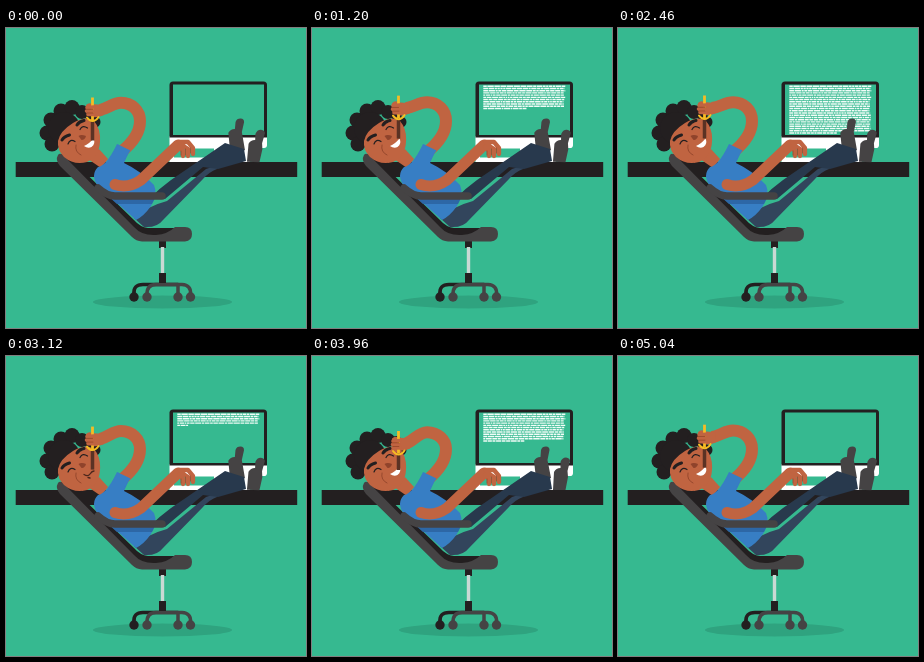
An HTML page for the animation above (5.07 s loop, 300x300 px).

```html
<!DOCTYPE html>
<html lang="en">
<head>
<meta charset="utf-8">
<title>Break at the desk</title>
<style>
  html, body { margin: 0; width: 100%; height: 100%; overflow: hidden; background: #36b990; }
  svg { display: block; width: 100vw; height: 100vh; }
  .line { fill: none; stroke-linecap: round; stroke-linejoin: round; }
  .flat { stroke-linecap: butt; }
</style>
</head>
<body>
<svg viewBox="0 0 300 300">
  <defs>
    <clipPath id="aboveLip"><path d="M70 50H100V114H70Z"/></clipPath>
  </defs>
  <rect width="300" height="300" fill="#36b990"/>
  <ellipse cx="156.500" cy="274" rx="69.500" ry="6.500" fill="#2fa37f"/>

  <!-- desk and monitor -->
  <path d="M163.500 119H244V134H163.500Z" fill="#fff"/>
  <path d="M168 120.500H208V129.500H168Z" fill="#36b990"/>
  <path d="M163.500 108H261V117Q261 120 258 120H166.500Q163.500 120 163.500 117Z" fill="#fff"/>
  <path d="M167 53.500H257.500Q261 53.500 261 57V109.500H163.500V57Q163.500 53.500 167 53.500Z" fill="#231f20"/>
  <rect x="167" y="56.500" width="91" height="50.500" fill="#36b990"/>
  <g id="screen" class="line flat" stroke="#f1fcf8" stroke-width="1.450"></g>
  <rect x="9.700" y="134" width="281.500" height="15" fill="#231f20"/>

  <!-- chair base -->
  <rect x="153" y="211" width="7" height="9" fill="#231f20"/>
  <rect x="154.800" y="219" width="3.400" height="27" fill="#c9d9d4"/>
  <path class="line" stroke="#231f20" stroke-width="3.500" d="M128 266Q127 256.500 137 256.500H172"/>
  <path class="line" stroke="#454344" stroke-width="3.500"
    d="M141 266Q141 256.500 150 256.500H176Q185 257 184.500 266M172 266V258"/>
  <rect x="153" y="245" width="7" height="10" fill="#231f20"/>
  <circle cx="128" cy="269" r="4.700" fill="#231f20"/>
  <g fill="#454344">
    <circle cx="141" cy="269" r="4.700"/><circle cx="172" cy="269" r="4.700"/>
    <circle cx="184.500" cy="269" r="4.700"/>
  </g>

  <!-- legs and shoes -->
  <path d="M128 190Q142 178 161 173L200 141L212 137L211 141Q203 144 197 151L157 192Q151 200 138 199Z" fill="#32455c"/>
  <g id="shoeL">
    <path d="M229 94Q230 90.500 234 90.500Q237.500 90.500 237.500 94L235.500 104L239 122L224 122L222 105Q224 101 228.500 101Z" fill="#454344"/>
  </g>
  <g id="shoeR">
    <path d="M248.500 106Q250 101.500 254 101.500Q258 102 258 105L255.500 115L256 121L253.500 134H241L242 116Q244 112 248.500 112Z" fill="#454344"/>
  </g>
  <path d="M144 170Q154 160 165 152L219 115L238 121L240 133L212 141L197 139L159 171Z" fill="#28394d"/>

  <!-- chair -->
  <path d="M54 127Q59 124 64 130L128 192Q134 199 142 200H170Q168 208 150 208H138L124 200Z" fill="#231f20"/>
  <path d="M52 127Q54 124 58 128L128 199Q136 208 150 207Q162 206 169 199H179Q186 199 186 206T179 213.500H136Q130 213 126 209L54 138Q49 132 52 127Z" fill="#454344"/>

  <!-- torso -->
  <path d="M82 131L93 121L102 131L95 140Z" fill="#c06441"/>
  <path d="M92 139Q95 139 101 133L112 116.500L124 122L118 135Q135 143 148 157Q152 166 145 178Q138 188 130 192L92 158Q84 147 92 139Z" fill="#377ec4"/>
  <path d="M102 168H150L146 176H111Z" fill="#2d67a6"/>

  <!-- chair arm and resting arm -->
  <path class="line" stroke="#454344" stroke-width="7.500" d="M92 160Q101 168 109 168H156"/>
  <path class="line" stroke="#c06441" stroke-width="11" d="M109 156.500Q122 161 135 152L172 117"/>
  <path class="line" stroke="#c06441" stroke-width="4.300" d="M173 114L182 114L187 120V126M176 117L182 121V128M173 119L177 123V128"/>
  <path class="line" stroke="#9d4b2e" stroke-width=".8" d="M175 123V127M179.500 121V127M184.500 120V125"/>

  <!-- head -->
  <g fill="#231f20">
    <circle cx="41" cy="105" r="7.500"/><circle cx="45" cy="92" r="7.500"/>
    <circle cx="55" cy="83" r="7.500"/><circle cx="66" cy="79.500" r="7.500"/>
    <circle cx="76" cy="84" r="7"/><circle cx="84" cy="86" r="6"/><circle cx="89" cy="94" r="5.500"/>
    <circle cx="46" cy="116" r="7.500"/><circle cx="58" cy="100" r="16"/>
  </g>
  <path d="M52 113Q54 103 67 95Q80 87 88 93Q95 101 94 114Q93 129 81 134Q68 137.500 58 129Q51 122 52 113Z" fill="#c06441"/>
  <g class="line" stroke="#231f20">
    <path stroke-width="3" d="M56 112Q58 108.500 63.500 107M71 97Q73 93.500 78 92.500"/>
    <path stroke-width="1.200" d="M62 116Q64 110.500 69 113.500M74 101.500Q76.500 96.500 81.500 100"/>
  </g>
  <path d="M72.500 108Q75 106 80 108Q79 112 75.500 112Z" fill="#8f432b"/>
  <path class="line" stroke="#97482d" stroke-width="1" d="M70 117Q68.500 124 75 127"/>
  <g id="mouthOpen">
    <path d="M78 118Q83 116 87.500 110.500Q90 116 85.500 119Q82 121 78 118Z" fill="#fff"/>
  </g>
  <path id="mouthShut" class="line" stroke="#4b261c" stroke-width="1.300" d="M78 118.500Q82 121 84 118T88 115M82 121.500L84 122"/>

  <!-- raised arm with snack bar -->
  <path id="arm" class="line flat" stroke="#c06441" stroke-width="12"/>
  <path d="M111 116L124.500 122.500L118 132L106 126Z" fill="#377ec4"/>
  <g clip-path="url(#aboveLip)">
    <path class="held line flat" stroke="#5b3224" stroke-width="3.500" d="M86.500 88V109.500"/>
  </g>
  <g class="held">
    <path d="M80 74Q83 71 86 73L97 74L98 84Q92 87 86 86L80 82Z" fill="#c06441"/>
    <path class="line flat" stroke="#f6bc24" stroke-width="2.800" d="M86.500 66.500V89"/>
    <path class="line" stroke="#f6bc24" stroke-width="2" d="M81 86.500Q83.500 90 86.500 90Q90 90 92.500 86"/>
    <path class="line" stroke="#c06441" stroke-width="3.600" d="M81 76.500L88 76M80.500 80L87 80M82 83.500L88 83.500"/>
    <path class="line" stroke="#964527" stroke-width=".8" d="M80 78.300H87M81 82H87"/>
  </g>
</svg>
<script>
  const LOOP = 5070, STEP = 60, BITE = LOOP / 4, PAGE = LOOP / 2;
  const ROWS = 22, ROW_TIME = 114, PITCH = 2.23, TOP = 58.2, LEFT = 171.3, WIDTH = 82;
  const $ = id => document.getElementById(id);
  const held = document.querySelectorAll('.held');

  // [time in bite, drop of the hand]
  const drops = [[0, 3], [157, 8.5], [270, 9], [400, 7.5], [590, 4],
    [700, 1.2], [850, 0], [1050, 0], [1195, 1], [BITE, 3]];

  function sample(table, t) {
    const i = table.findIndex(k => k[0] > t);
    const [t0, a] = table[i - 1], [t1, b] = table[i];
    return a + (b - a) * (t - t0) / (t1 - t0);
  }

  let seed = 41;
  const random = () => (seed = seed * 16807 % 2147483647) / 2147483647;

  function makeRow(_, i) {
    const words = [];
    const end = LEFT + WIDTH - random() * 2;
    for (let x = LEFT; x < end;) {
      const w = Math.min(1.5 + random() * 5, end - x);
      words.push([x, x + w]);
      x += w + 0.6;
    }
    const path = document.createElementNS('http://www.w3.org/2000/svg', 'path');
    $('screen').append(path);
    return { path, words, y: TOP + i * PITCH };
  }
  const rows = Array.from({ length: ROWS }, makeRow);

  function type(t) {
    const typed = t / ROW_TIME;
    const blank = typed > ROWS - 0.2;
    rows.forEach(({ path, words, y }, i) => {
      const part = blank ? 0 : Math.max(0, Math.min(1, typed - i));
      const edge = LEFT + WIDTH * part;
      path.setAttribute('d', words.filter(w => w[0] < edge)
        .map(([a, b]) => `M${a} ${y}H${Math.min(b, edge)}`).join(''));
    });
  }

  function draw(time) {
    const t = Math.floor(time % LOOP / STEP) * STEP;
    const phase = t % BITE;
    const dy = sample(drops, phase);
    held.forEach(h => h.setAttribute('transform', `translate(0 ${dy})`));
    const top = 74 + dy * 0.25;
    $('arm').setAttribute('d', `M115 124Q134 109 134 93C134 ${top + 8} 126 ${top}
      115 ${top}C107 ${top} 103 ${78 + dy * 0.7} 94 ${79 + dy}`);

    const shut = phase > 300 && phase < 900;
    $('mouthOpen').style.display = shut ? 'none' : '';
    $('mouthShut').style.display = shut ? '' : 'none';

    const swing = 2 * Math.cos(4 * Math.PI * phase / BITE);
    $('shoeL').setAttribute('transform', `rotate(${swing * 0.6} 230 121)`);
    $('shoeR').setAttribute('transform', `rotate(${swing} 248 132)`);
    type(t % PAGE);
  }

  const start = performance.now();
  function tick() {
    draw(performance.now() - start);
    requestAnimationFrame(tick);
  }
  tick();
</script>
</body>
</html>
```
